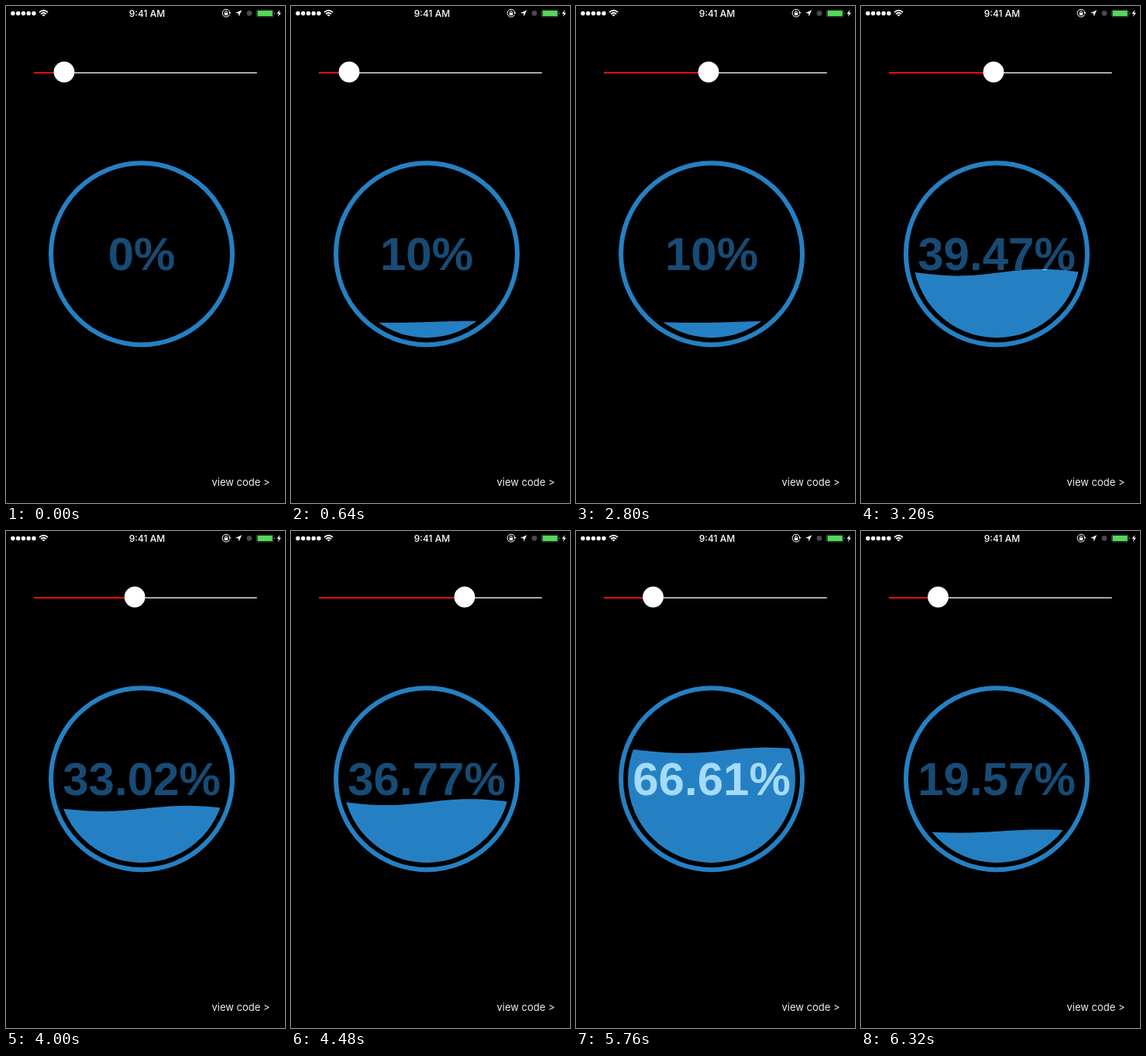
These frames come from a looping animation (360x640 px, 6400 ms). An HTML page:

```html
<!DOCTYPE html>
<html lang="en">
<head>
<meta charset="utf-8">
<title>Liquid gauge</title>
<style>
  html, body { margin: 0; width: 100%; height: 100%; overflow: hidden; background: #000; }
  svg { display: block; width: 100%; height: 100%; }
  .ui { font-family: Inter, Roboto, sans-serif; fill: #fff; }
  .value { font: bold 60px "Liberation Sans", Arial, sans-serif; text-anchor: middle; }
</style>
</head>
<body>
<svg viewBox="0 0 360 640">
  <defs>
    <clipPath id="waveClip"><path id="wave"/></clipPath>
  </defs>
  <rect width="360" height="640" fill="#000"/>

  <g id="status" fill="#fff">
    <g id="signal"></g>
    <g fill="none" stroke="#fff" stroke-width="1.7">
      <path d="M43 8.1Q48.5 3.1 54 8.1"/>
      <path d="M45 10.3Q48.5 7.2 52 10.3"/>
    </g>
    <path d="M46.5 11.5Q48.5 9.9 50.5 11.5L48.5 13.6Z"/>
    <text class="ui" x="182" y="13.7" font-size="12" font-weight="500" text-anchor="middle">9:41 AM</text>
    <path d="M288.5 11.2A4.9 4.9 0 1 1 288.9 8.6" fill="none" stroke="#fff"/>
    <path d="M287.1 8.2h3.4l-1.7 2.4Z"/>
    <rect x="281.8" y="8.7" width="4.4" height="3.3" rx=".5"/>
    <path d="M282.7 9V7.8a1.3 1.3 0 0 1 2.6 0V9" fill="none" stroke="#fff" stroke-width=".9"/>
    <path d="M304.2 5.2L300.6 13.4L300 9.6L296 9Z"/>
    <circle cx="314" cy="9.3" r="3.4" fill="#4a4a4a"/>
    <rect x="323.5" y="5" width="21.4" height="9" rx="1.6" fill="none" stroke="#666" stroke-width=".7"/>
    <rect x="324.6" y="6" width="19.2" height="7" rx=".6" fill="#53d85a"/>
    <path d="M346 7.8q1.5 1.6 0 3.3Z" fill="#aaa"/>
    <path d="M353.4 5L349.6 10H352L350.8 14L355 8.8H352.5Z"/>
  </g>

  <rect x="36" y="85" width="288" height="2" rx="1" fill="#a8aaa9"/>
  <rect id="track" x="36" y="85" height="2" rx="1" fill="#e20d0d"/>
  <circle id="thumb" cy="85" r="13.4" fill="#fff"/>

  <circle cx="175" cy="319.2" r="117" fill="none" stroke="#2580c3" stroke-width="6"/>
  <text id="dryText" class="value" x="175" y="340" fill="#174b75"></text>
  <g clip-path="url(#waveClip)">
    <circle cx="175" cy="319.2" r="108" fill="#2580c3"/>
    <text id="wetText" class="value" x="175" y="340" fill="#a4dbf8"></text>
  </g>

  <text class="ui" x="340.6" y="618" font-size="13" text-anchor="end" style="fill:#f0f0f0">view code &gt;</text>
</svg>
<script>
const LOOP = 6400, STEP = 80, RISE = 500;
const CX = 175, CY = 319.5, R = 108;
const DRIFT = 0.012; // wave travel, px per ms

// slider drag: [time, thumb x]
const drag = [
  [0, 75], [1200, 75], [1440, 83.5], [2080, 96], [2800, 171], [3360, 171],
  [3660, 127.6], [3840, 127.6], [4240, 224], [4880, 224], [5200, 170],
  [5760, 99.5], [6400, 99.5]
];

// each release of the thumb: [time, new level]
const fills = [[60, 10], [2882, 46.51], [3680, 29.92], [4300, 66.61], [5876, 19.3]];

const $ = id => document.getElementById(id);
const thumb = $("thumb"), track = $("track"), wave = $("wave");
const texts = [$("dryText"), $("wetText")];

$("signal").innerHTML = [0, 1, 2, 3, 4]
  .map(i => `<circle cx="${8.9 + i * 6.75}" cy="9.5" r="2.7"/>`).join("");

const easeInOut = u => u < 0.5 ? 4 * u ** 3 : 1 - 4 * (1 - u) ** 3;

function sliderAt(t) {
  const i = drag.findIndex(k => k[0] > t);
  const [t0, x0] = drag[i - 1], [t1, x1] = drag[i];
  return x0 + (x1 - x0) * (t - t0) / (t1 - t0);
}

function gaugeAt(t) {
  let from = 0, level = 0, start = 0;
  for (const [at, to] of fills) {
    if (t < at) break;
    from = level;
    start = at;
    level = from + (to - from) * easeInOut(Math.min(1, (t - at) / RISE));
  }
  return { level, shift: (t - start) * DRIFT };
}

function wavePath(level, shift) {
  const amp = R * 0.05 * (1 - Math.abs(level - 50) / 50);
  const mid = CY + R + amp - level / 100 * 2 * (R + amp);
  const left = CX - R;
  let d = "";
  for (let x = left; x <= CX + R; x += 3) {
    const y = mid + amp * Math.sin((x - left - shift) * Math.PI / R);
    d += `${d ? "L" : "M"}${x} ${y.toFixed(2)}`;
  }
  return `${d}V${CY + R + 10}H${left}Z`;
}

function draw(t) {
  const x = sliderAt(t);
  thumb.setAttribute("cx", x);
  track.setAttribute("width", x - 36);

  const { level, shift } = gaugeAt(t);
  wave.setAttribute("d", wavePath(level, shift));
  const label = +level.toFixed(2) + "%";
  for (const el of texts) el.textContent = label;
}

const begin = performance.now();
function tick() {
  const t = (performance.now() - begin) % LOOP;
  draw(Math.floor(t / STEP) * STEP);
  requestAnimationFrame(tick);
}
draw(0);
requestAnimationFrame(tick);
</script>
</body>
</html>
```
